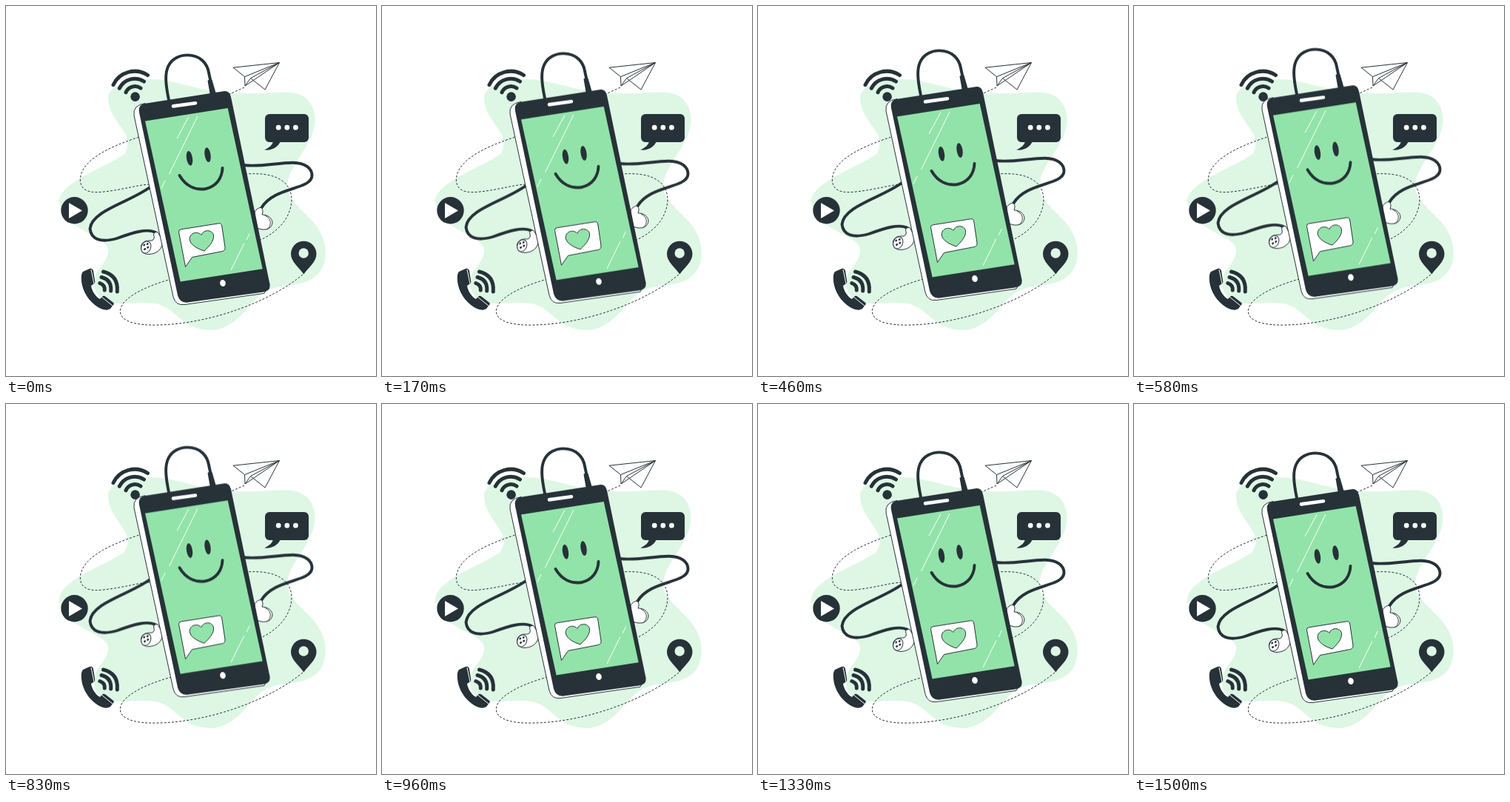
An HTML page without scripts for the animation above (1.54 s loop, 500 by 500 pixels).

```html
<!DOCTYPE html>
<html lang="en">
<head>
<meta charset="utf-8">
<title>Happy phone</title>
<style>
  html, body { margin: 0; width: 100%; height: 100%; overflow: hidden; background: #fff; }
  svg { display: block; width: 100vw; height: 100vh; }
  .dark { fill: #263238; }
  .white { fill: #fff; }
  .green { fill: #92e3a9; }
  .pale { fill: #def7e5; }
  .line { fill: none; stroke: #263238; stroke-linecap: round; stroke-linejoin: round; }
  .thin { stroke: #263238; stroke-width: 1; stroke-linejoin: round; }
  .cord { stroke-width: 3.9; }
  .signal { stroke-width: 5; }
  .trail { stroke-width: 1; stroke-dasharray: 2.9 2.2; stroke-linecap: butt; }
  .glare { fill: none; stroke: #fff; stroke-width: 1; }
  .light { stroke: #fff; }

  /* Linear bob at 24 frames per second: 37 steps per loop */
  .float { animation: float 1.54s -5ms infinite; }
  @keyframes float {
    0% { transform: translateY(0); animation-timing-function: steps(17, end); }
    45.946% { transform: translateY(-9.444px); animation-timing-function: steps(18, end); }
    94.595% { transform: translateY(.556px); animation-timing-function: step-end; }
    97.297%, 100% { transform: translateY(0); }
  }
</style>
</head>
<body>
<svg viewBox="0 0 500 500">
  <!-- Backdrop -->
  <path class="pale" d="M138 124C139 108 164 99 195 99C228 99 252 113 300 117.500C335 120 357 116 382 116.500C408 118 418 136 417.500 155C416 190 380 215 380 245C382 274 432 287 432 334C431 363 412 374 387 377C361 379 348 385 336 398C321 414 304 438 276 438C235 437 230 407 202 402C178 400 166 402 146 402C128 400 117 387 119 370C122 354 139 346 138 328C135 309 79 304 72 266C71 238 132 220 160 200C178 172 138 158 138 124Z"/>
  <path class="line trail" d="M322 110L300 120C260 145 220 164 180 177C150 187 101 205 100.300 235C101 251 115 253 132 251C160 248 176 242 194 241C240 239 290 228 325 227C365 224 386 238 386 262C385 285 370 302 350 313C310 334 260 357 220 370C182 381 154 397 154.300 413C155 427 178 432 206 431C278 429.500 360 398 402 362"/>

  <!-- Wifi -->
  <circle class="dark" cx="174.600" cy="122.600" r="6.300"/>
  <path class="line signal" d="M145 106.500A32 32 0 0 1 191.500 93.500M153.300 111.200A23 23 0 0 1 186.500 102M162 116.800A13.500 13.500 0 0 1 182 111"/>

  <!-- Paper plane -->
  <path class="white thin" d="M307 83.200L369.500 76.500L350 113L330.500 97.500L323 108L322.500 95.500ZM322.500 95.500L369.500 76.500L330.500 97.500M323 108L369.500 76.500"/>

  <!-- Chat -->
  <rect class="dark" x="350" y="146" width="59" height="38" rx="6"/>
  <path class="dark" d="M361 183C360 188 355 192 349 194.500C360 195.500 367 191 371 183Z"/>
  <path class="line light" stroke-width="6.800" d="M368.200 164.200h0M379.800 164.200h0M391.400 164.200h0"/>

  <!-- Play -->
  <circle class="dark" cx="92.500" cy="276.300" r="18.200"/>
  <path class="white" d="M85 266V287L103 276.500Z"/>

  <!-- Call -->
  <path class="dark" d="M104 359Q101 362 102 372C104 390 117 405 131 410Q137 412 141 409L145 404Q147 402 144 400L135 393Q132 390.500 129.500 393L127 396C121 393 116 385 115 378L118 376Q121 375 120 371L118 358Q117 354 113 355Z"/>
  <path class="glare" d="M115 356L119 375.500M129 393L144.500 405.500"/>
  <path class="line signal" d="M131.500 359Q152 364 150.300 386M129 366.500Q143 370 141.700 385M126.800 374.500Q134 377 133.300 384"/>

  <!-- Pin -->
  <path class="dark" d="M402.300 362.500C396 353 385 346 385 335A17.200 17.200 0 0 1 419.500 335C419.500 346 409 353 402.300 362.500Z"/>
  <circle class="pale" cx="402.200" cy="334" r="6.700"/>

  <g class="float">
    <!-- Earphones -->
    <path class="line cord" d="M220 127C215 103 215 91 219 82C224 71 235 66.400 245 66.400C263 66.400 272 78 274 90L277 104"/>
    <path class="dark" d="M272.500 101Q275 98 278.500 100L284 119L276 121Z"/>
    <path class="line cord" d="M195 244.500C168 265 116 276 113.500 301C115 316 129 320 150 314C172 306 191 300 202 306"/>
    <path class="line cord" d="M321 215C345 218 366 211.500 388 211.700C404 212 414 219 413.500 230C411 249 362 244 345 273"/>
    <path class="white thin" d="M199.500 309Q200 305 205 305.500L212 318C211 328 205 335 193 335.500C185 336 181 329 183 323C186 317 191 317 197 317Q202 315 199.500 309Z"/>
    <ellipse class="white thin" cx="189.300" cy="326" rx="6.300" ry="8.300" transform="rotate(22 189.300 326)"/>
    <path class="line" stroke-width="2.500" d="M186.500 323.300l.4-.5M191 321.800l.5-.6M187.300 328.800l.7-.5M191.500 326.500l.5-.6"/>
    <path class="white thin" d="M336 278Q340 272 345 272.500Q348.500 276 346 282C354 282 360 287 360 293C359 300 354 302.500 346 302L338 300Z"/>
    <path class="line" stroke-width=".9" d="M350 283Q358 287 357.300 294Q356.500 300 352 302"/>

    <!-- Phone -->
    <path class="white thin" d="M188 131.500Q171 134 173 148L226 393Q229 405 241 403.600L349 388.300L356 376Z"/>
    <path class="dark" d="M188 131.800L294 115.200Q302 114 304 123L356.300 375Q358.300 384.800 348 386.400L246 400.500Q235 402 232 391L180 144Q178 133.500 188 131.800Z"/>
    <path class="green" d="M188 155.600L299.700 138L346.700 355.300L235.600 372.500Z"/>
    <path class="line light" stroke-width="4.600" d="M226 135.400L256 131.200"/>
    <ellipse class="white" cx="293" cy="374.500" rx="3.800" ry="4.500" transform="rotate(-10 293 374.500)"/>
    <path class="glare" d="M247 149.500L231 179M259 149L220.500 227M215 236L210 246.500M329.500 307L325 316M322 320.500L304 357"/>

    <!-- Face -->
    <ellipse class="dark" cx="248" cy="205.800" rx="4" ry="10" transform="rotate(-9 248 205.800)"/>
    <ellipse class="dark" cx="272.500" cy="201.200" rx="4" ry="10" transform="rotate(-9 272.500 201.200)"/>
    <path class="line cord" d="M234.500 229C243 243.500 256 249.500 270 247C284 243.500 292 233 292.500 219"/>

    <!-- Heart message -->
    <path class="white thin" d="M236.500 301.800L287.500 293.800Q291 293.300 291.700 297L296 326Q296.500 330.500 292.500 331.500L251.500 339.500L242.500 352.500L233.500 305.500Q233 302.300 236.500 301.800Z"/>
    <path class="green thin" d="M268 331C257 327.500 249 322 248.200 315.500C247.800 306.500 259 303.500 264 309.500C267 301.500 278.500 302 280.500 309.500C281.500 318 274 325 268 331Z"/>
  </g>
</svg>
</body>
</html>
```
